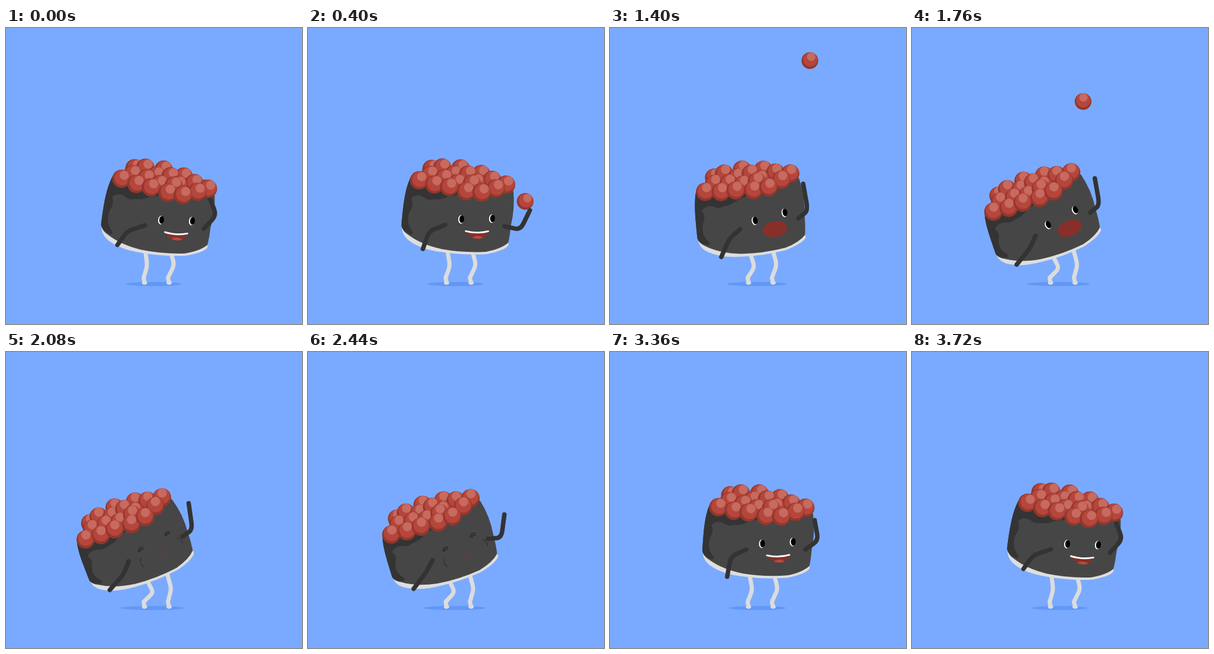
An HTML page that plays this animation: 500 px wide and 500 px high, repeating every 3760 ms.

```html
<!DOCTYPE html>
<html lang="en">
<head>
<meta charset="utf-8">
<title>Roe snack</title>
<style>
html, body { margin: 0; width: 100%; height: 100%; overflow: hidden; background: #7aaaff; }
svg { display: block; width: 100vw; height: 100vh; }
.limb { fill: none; stroke-linecap: round; stroke-linejoin: round; }
</style>
</head>
<body>
<svg viewBox="0 0 500 500">
  <defs>
    <g id="berry">
      <circle r="15.5" fill="#93372d"/>
      <circle cx="1.3" cy="-1.9" r="13.2" fill="#b5463b"/>
      <circle cx="4" cy="-6.4" r="7.8" fill="#c76a60"/>
    </g>
    <clipPath id="lips"><path id="lipShape"/></clipPath>
  </defs>
  <rect width="500" height="500" fill="#7aaaff"/>
  <ellipse id="shadow" cy="432.5" ry="3.6" fill="#6198f6"/>
  <g class="limb" stroke="#dcdcdc" stroke-width="7">
    <path id="legL"/><path id="legR"/>
  </g>
  <g fill="#dcdcdc">
    <ellipse cx="234" cy="430.5" rx="4.5" ry="3"/>
    <ellipse cx="275.5" cy="430.5" rx="4.5" ry="3"/>
  </g>
  <path id="rice" fill="#dedede"/>
  <path id="nori" fill="#464646"/>
  <path id="shade" fill="#343434"/>
  <g id="face">
    <g id="eyes"></g>
    <g id="lids" class="limb" stroke="#242424" stroke-width="1.5">
      <path d="M252 323Q255 316 262 320M254 324Q257 320 261 323M304 320Q307 313 314 317M306 321Q309 317 313 320"/>
      <path d="M250.4 334.4Q243 342 248 349.7M320 331.5Q328 337 324 345" stroke="#303030" stroke-width="1.2"/>
    </g>
    <path id="mouth" fill="#87302a"/>
    <g clip-path="url(#lips)"><ellipse id="tongue" cx="286" cy="354" rx="10" ry="4.5" fill="#b9493e"/></g>
    <path id="teeth" class="limb" stroke="#fff" stroke-width="2.8"/>
  </g>
  <g class="limb" stroke="#333" stroke-width="7.5">
    <path id="armL"/><path id="armR"/>
  </g>
  <use id="ballBack" href="#berry"/>
  <g id="roe"></g>
  <use id="ballFront" href="#berry"/>
</svg>
<script>
const LOOP = 3760, STEP = 40;
const TOSS = 1140, CATCH = 1910;
const $ = id => document.getElementById(id);
const set = (id, attrs) => { for (const k in attrs) $(id).setAttribute(k, attrs[k]); };
const mix = (a, b, u) => a + (b - a) * u;
const mixAll = (a, b, u) => a.map((v, i) => mix(v, b[i], u));
const add = (a, b) => a.map((v, i) => v + b[i]);
const ramp = (t, from, to) => Math.min(1, Math.max(0, (t - from) / (to - from)));
const ease = (t, from, to) => { const u = ramp(t, from, to); return u * u * (3 - 2 * u); };

const NORI = "M168 256C160 275 158 300 156 335Q158 344 168 350Q190 366 225 373Q262 379 300 376Q325 371 337 360Q340 345 341 330Q347 300 343 272Q338 256 325 252L180 250Z";
const RICE = "M157 335Q156 350 170 360Q190 374 225 378Q262 383 300 380Q330 374 337 365L338 340Z";
const SHADE = "M168 256C160 275 158 300 156 335Q158 344 172 349Q178 349 174 343Q163 330 169 312Q177 300 171 290Q180 281 192 287Q200 293 208 290Q222 291 232 285L255 280L255 262Z";

// mouth outlines: start, upper curve, lower curve
const SMILE = [265, 342, 277, 344.5, 291, 344.5, 303, 341, 299, 358, 275, 359];
const GAPE = [266, 342, 268, 325, 308, 326, 308, 344, 308, 361, 266, 360];
const SHUT = [282, 346, 284, 345, 288, 344.5, 290, 345, 288, 348, 284, 348];

// right arm poses: elbow and hand, measured from the shoulder
const TUCKED = [21, -23, 9, -54];
const WAVE = [27, 6, 43, -27];
const OFFER = [12, 25, 50, 15];
const RAISED = [16, -13, 8, -58];
const BENT = [23, -2, 28, -41];

// glints of the roe, back to front
const ROE = [
  [207, 233], [225, 230], [256, 230], [291, 238], [205, 243], [245, 241], [269, 240],
  [310, 247], [229, 248], [252, 255], [283, 253], [276, 255], [334, 254], [187, 253],
  [213, 259], [238, 262], [317, 261], [267, 268], [293, 269]
];
$("roe").innerHTML = ROE.map(([x, y]) => `<use href="#berry" x="${x - 4}" y="${y + 6.4}"/>`).join("");
$("eyes").innerHTML = [[257, 322], [309, 319]].map(([x, y]) =>
  `<g class="eye" data-at="${x} ${y}"><ellipse cx="-.6" cy=".4" rx="4.8" ry="7.2" fill="#fff"/><ellipse cx=".6" rx="4.1" ry="6.5"/></g>`).join("");
const eyes = [...document.querySelectorAll(".eye")];

// Tilt of the roe in degrees: settle, throw back, overshoot, recover, return.
function tilt(t) {
  return 6.2 * (1 - ramp(t, 0, 1100)) ** 2
    - 26.5 * ease(t, TOSS, 1680) - 3.5 * ease(t, 1680, 1960)
    + 5 * ease(t, 1960, 2440) + 31.2 * ease(t, 2760, 3600);
}

function turn(x, y, deg) {
  const r = deg * Math.PI / 180, c = Math.cos(r), s = Math.sin(r);
  return [x * c - y * s, x * s + y * c];
}

// The roe and the base tilt by different amounts; the sides blend between them.
function pose(t) {
  const a = tilt(t), low = a * (a > 0 ? 0.4 : 0.8);
  const sit = 4 * (ease(t, 1960, 2400) - ease(t, 3200, 3600));
  const top = [187 + 2 * a + 0.0075 * a * a, 253 - 0.9 * a + 0.034 * a * a + sit];
  const base = [247 + 0.65 * a, 347.5 + 0.4 * Math.abs(a) + sit / 2];
  const warp = (x, y) => mixAll(
    add(top, turn(x - 187, y - 253, a)),
    add(base, turn(x - 247, y - 347.5, low)),
    ramp(y, 265, 350));
  return { a, low, top, warp };
}
const bend = (d, warp) => d.replace(/([\d.]+) ([\d.]+)/g,
  (m, x, y) => warp(+x, +y).map(v => v.toFixed(2)).join(" "));

function limb(a, b, c, tail = "") {
  const p = mixAll(a, b, 0.68), q = mixAll(b, c, 0.32);
  return `M${a}L${p}Q${b} ${q}L${c}${tail}`;
}

function rightArm(t) {
  let arm = mixAll(TUCKED, WAVE, ease(t, 60, 400));
  arm = mixAll(arm, OFFER, ease(t, 480, 1020));
  arm = mixAll(arm, RAISED, ease(t, TOSS, 1380));
  arm = mixAll(arm, BENT, ease(t, 1980, 2440));
  return mixAll(arm, TUCKED, ease(t, 3000, 3600));
}

const flight = t => [267 + (1923 - t) * 0.135, 19 + 0.00204 * (t - 1533) ** 2];

function drawFace(t, { a, low, warp }) {
  const gape = ease(t, 1160, 1420) * (1 - ease(t, 1900, 1990));
  const shut = ease(t, 1900, 1990) - ease(t, 2740, 2860);
  set("face", { transform: `translate(${warp(283, 330)}) rotate(${mix(a, low, 0.3)}) translate(-283 -330)` });
  eyes.forEach(e => {
    e.setAttribute("transform", `translate(${e.dataset.at}) scale(1 ${Math.max(0.02, 1 - shut)})`);
    e.setAttribute("opacity", shut > 0.9 ? 0 : 1);
  });
  set("lids", { opacity: shut });
  const m = mixAll(mixAll(SMILE, GAPE, gape), SHUT, shut);
  const lip = `M${m.slice(0, 2)}C${m.slice(2, 8)}`;
  const shape = `${lip}C${m.slice(8)} ${m.slice(0, 2)}Z`;
  const grin = Math.max(0, 1 - 2 * gape) * (1 - shut);
  set("mouth", { d: shape });
  set("lipShape", { d: shape });
  set("teeth", { d: lip, opacity: grin });
  set("tongue", { opacity: grin });
}

function draw(t) {
  const body = pose(t), { a, top, warp } = body;
  const lean = -a / 27.5, fore = Math.max(0, a);

  set("shadow", { cx: 249 - 2 * lean, rx: 48 + 5 * lean });
  set("legL", { d: limb([236 + 3.5 * lean, 378 + 10 * lean], [240.5 + 8 * lean, 402 + 4 * lean], [232.5, 422], "L234 430") });
  set("legR", { d: limb([277 - 4 * lean, 376], [283.5 - 4 * lean, 400], [273.5, 422], "L275.5 430") });
  set("rice", { d: bend(RICE, warp) });
  set("nori", { d: bend(NORI, warp) });
  set("shade", { d: bend(SHADE, warp) });
  set("roe", { transform: `translate(${top}) rotate(${a}) translate(-187 -253)` });
  drawFace(t, body);

  const left = warp(230, 332), right = warp(330, 332), arm = rightArm(t);
  const hand = add(right, arm.slice(2));
  set("armL", { d: limb(left,
    add(left, [-26 - 0.6 * a, 12 - 0.35 * a]),
    add(left, [-32 - 2.3 * fore, 46 - 2 * fore - 0.1 * a])) });
  set("armR", { d: limb(right, add(right, arm.slice(0, 2)), hand) });

  const ball = t < TOSS ? add(hand, [-8, -15]) : flight(t);
  const transform = `translate(${ball}) rotate(${a}) scale(.91)`;
  set("ballBack", { transform, display: t < 360 ? "inline" : "none" });
  set("ballFront", { transform, display: t >= 360 && t < CATCH ? "inline" : "none" });
}

const start = performance.now();
function tick() {
  const t = (performance.now() - start) % LOOP;
  draw(Math.floor(t / STEP) * STEP);
  requestAnimationFrame(tick);
}
tick();
</script>
</body>
</html>
```
